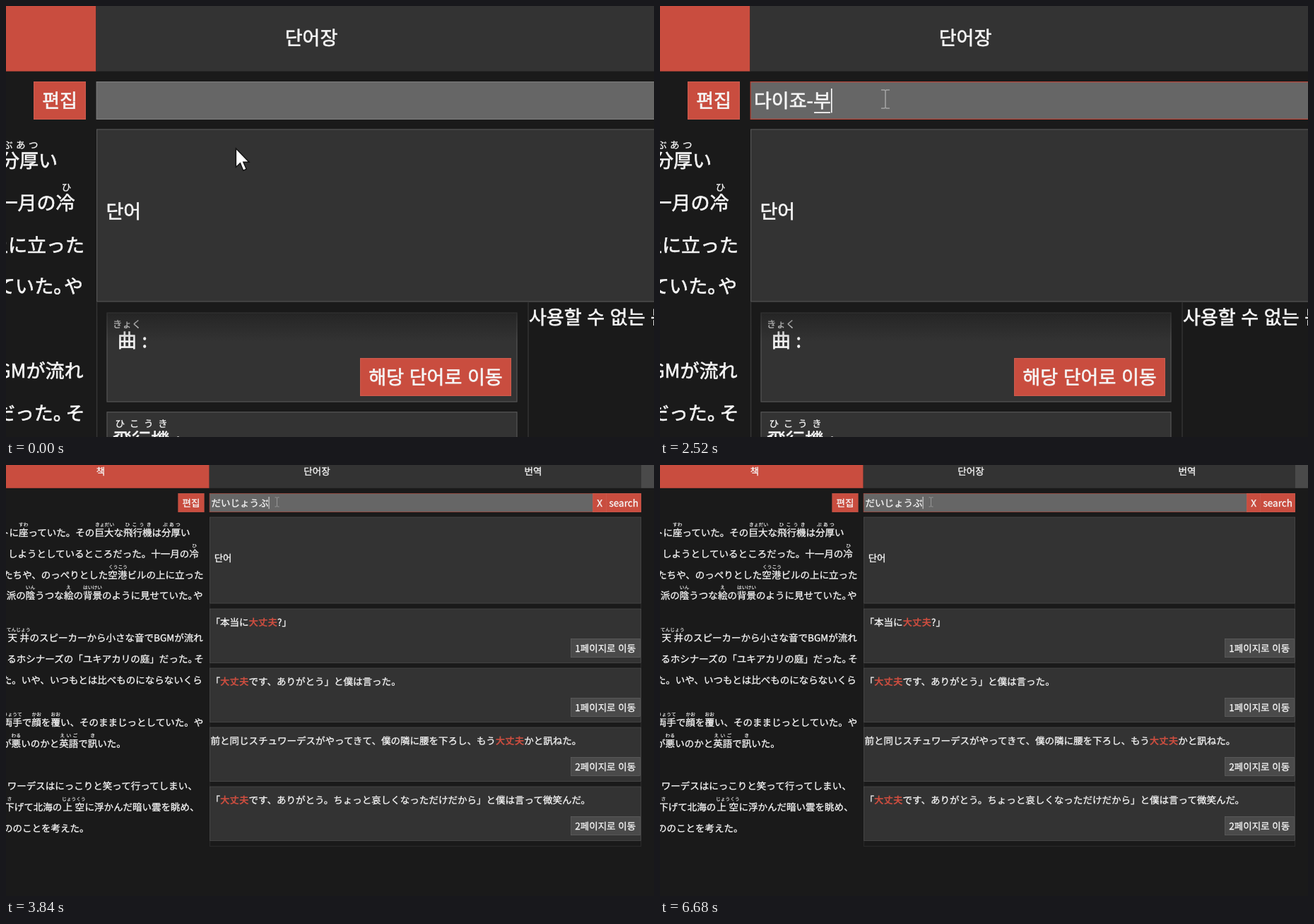
Write an HTML page that moves like this. It is 917 px wide and 611 px high and loops after 6720 ms.

```html
<!DOCTYPE html>
<html lang="ja">
<head>
<meta charset="utf-8">
<title>Word search</title>
<style>
html, body { margin: 0; width: 100%; height: 100%; overflow: hidden; background: #1a1a1a; }
svg { display: block; width: 917px; height: 611px; }
text {
  font: 500 13.53px "Noto Sans CJK JP", "Noto Sans CJK KR", "Noto Sans CJK", sans-serif;
  word-spacing: .8px; white-space: pre; text-rendering: geometricPrecision;
  fill: #f6f6f6; stroke: #f6f6f6; stroke-width: .32px;
}
text.ruby { font-size: 6.77px; stroke-width: .16px; }
text.mid, text.ruby { text-anchor: middle; }
.hit { fill: #c94d3f; stroke: none; font-weight: 700; }
</style>
</head>
<body>
<svg viewBox="0 0 917 611"><g id="world"></g></svg>
<script>
const LOOP = 6720, EM = 13.53, RUBY = 6.77;
const RED = '#c94d3f', PANEL = '#333', EDGE = '#555';

// Drawing helpers; text is placed by its vertical centre.
const rect = (x, y, w, h, fill, stroke = 'none', more = '') =>
  `<rect x="${x}" y="${y}" width="${w}" height="${h}" fill="${fill}" stroke="${stroke}" stroke-width=".6" ${more}/>`;
const text = (x, y, s, cls = '') => `<text x="${x}" y="${y + 5}" class="${cls}">${s}</text>`;
const line = (x1, y1, x2, y2) =>
  `<path d="M${x1} ${y1}L${x2} ${y2}" stroke="#363636" stroke-width=".7"/>`;
const group = (id, body) => `<g id="${id}">${body}</g>`;

function ruby(x, y, n, s) {
  const slot = Math.max(RUBY, n * EM / s.length);
  const left = x + (n * EM - slot * s.length) / 2;
  return [...s].map((c, i) =>
    `<text class="ruby" x="${left + (i + .5) * slot}" y="${y - 8.6}">${c}</text>`).join('');
}

const button = (x, y, w, s, fill = RED, stroke = '#cd5a4d') =>
  rect(x + .3, y + .3, w - .6, 26.4, fill, stroke) + text(x + w / 2, y + 13.5, s, 'mid');

// Book lines: y, then [x, text] runs
const book = [
  [96, [-9.5, 'トに座っていた。その巨大な飛行機は分厚い']],
  [126, [2.5, 'しようとしているところだった。十一月の冷']],
  [156, [-4.3, 'たちや、のっぺりとした空港ビルの上に立った']],
  [185, [.4, '派の陰うつな絵の背景のように見せていた。'], [264.6, 'や']],
  [245, [2, '天'], [19, '井'], [33, 'のスピーカーから小さな音でBGMが流れ']],
  [275, [.9, 'るホシナーズの「ユキアカリの庭」だった。'], [265.8, 'そ']],
  [305, [-5.7, 'た。いや、いつもとは比べものにならないくら']],
  [365, [-4.6, '両手で顔を覆い、そのままじっとしていた。や']],
  [395, [-6.3, 'が悪いのかと英語で訊いた。']],
  [455, [1.3, 'ワーデスはにっこりと笑って行ってしまい、']],
  [485, [-2.2, '下げて北海の'], [80, '上'], [97, '空'], [111, 'に浮かんだ暗い雲を眺め、']],
  [515, [-4.5, 'ののことを考えた。']]
];

// Readings: x, y, width in characters, kana
const readings = [
  [17.5, 96, 1, 'すわ'], [125.7, 96, 2, 'きょだい'], [166.3, 96, 3, 'ひこうき'], [220.5, 96, 2, 'ぶあつ'],
  [259.6, 126, 1, 'ひ'], [144.5, 156, 2, 'くうこう'], [27.4, 185, 1, 'いん'], [81.5, 185, 1, 'え'],
  [108.6, 185, 2, 'はいけい'], [3.8, 245, 2, 'てんじょう'], [-4.6, 365, 2, 'りょうて'], [36, 365, 1, 'かお'],
  [63, 365, 1, 'おお'], [7.2, 395, 1, 'わる'], [74.9, 395, 2, 'えいご'], [115.5, 395, 1, 'き'],
  [-2.2, 485, 1, 'さ'], [82, 485, 2, 'じょうくう']
];

const words = [
  ['曲', 1, 'きょく'], ['飛行機', 3, 'ひこうき'], ['整備工', 3, 'せいびこう'],
  ['思い', 1, 'おも'], ['座って', 1, 'すわ'], ['巨大', 2, 'きょだい']
];

const hit = '<tspan class="hit">大丈夫</tspan>';
const results = [
  [`「本当に${hit}?」`, 1],
  [`「${hit}です、ありがとう」と僕は言った。`, 1],
  [`前と同じスチュワーデスがやってきて、僕の隣に腰を下ろし、もう${hit}かと訊ねた。`, 2],
  [`「${hit}です、ありがとう。ちょっと哀しくなっただけだから」と僕は言って微笑んだ。`, 2]
];

const bookPart = '<g transform="translate(.4 0)">' +
  book.map(([y, ...runs]) => runs.map(([x, s]) => text(x, y, s)).join('')).join('') +
  readings.map(r => ruby(...r)).join('') + '</g>';

const header = rect(-30, -16, 317.7, 48.8, RED) + rect(287.7, -16, 611.3, 48.8, PANEL) +
  rect(899, -16, 30, 48.8, '#4a4a4a') +
  text(134, 9, '책', 'mid') + text(440, 9, '단어장', 'mid') + text(746, 9, '번역', 'mid');

const wordCard = ([w, n, kana], i) => {
  const y = 204 + i * 70.35, x = i ? 299.5 : 302.9;
  return rect(295.5, y, 290, 63, PANEL, EDGE) + text(x, y + 19.5, w + ' :') +
    ruby(x, y + 19.2, n, kana) + button(474.5, y + 32, 107, '해당 단어로 이동');
};

const listPart = line(288.3, 196, 288.3, 620) + line(593.5, 196, 593.5, 620) + line(899, 196, 899, 620) +
  words.map(wordCard).join('') + rect(288.7, 196.4, 304.4, 28, 'url(#shade)') +
  text(594, 207, '사용할 수 없는 문자가 포함되어 있음');

const resultPart = rect(288.3, 196, 610.4, 344.5, 'none', '#363636') + results.map(([s, page], i) => {
  const y = 204 + i * 84;
  return rect(288.5, y, 610, 76.5, PANEL, EDGE) + text(289.4, y + 18.5, s) +
    button(799, y + 42, 98.5, page + '페이지로 이동', '#4a4a4a', '#666');
}).join('');

const arrow = '<path id="arrow" d="M0 0V13.2L3 10.4L5.2 15.6L7.4 14.6L5.2 9.6H9.3Z" fill="#fff" stroke="#111" stroke-width=".7"/>';
const beam = '<path id="beam" d="M-3 -6.5H-.7L0 -6L.7 -6.5H3M0 -6V6M-3 6.5H-.7L0 6L.7 6.5H3" fill="none" stroke="#a2a2a2" stroke-width=".8"/>';

const $ = id => document.getElementById(id);
$('world').innerHTML =
  `<defs><linearGradient id="shade" x2="0" y2="1">
    <stop stop-color="#1a1a1a" stop-opacity=".9"/><stop offset=".4" stop-color="#1a1a1a" stop-opacity=".45"/>
    <stop offset="1" stop-color="#1a1a1a" stop-opacity="0"/></linearGradient></defs>` +
  bookPart + header + button(243.5, 40, 37, '편집') +
  rect(288.1, 40.3, 610.6, 26.4, '#666', '#7a7a7a', 'id="field"') +
  text(290.5, 53.5, '').replace('<text', '<text id="query"') +
  rect(0, 61.6, 0, .9, '#f6f6f6', 'none', 'id="under"') +
  rect(0, 45, .8, 17.2, '#fff', 'none', 'id="caret"') +
  button(849.3, 40, 49.7, 'search') + group('clear', button(830, 40, 20, 'X')) +
  rect(288.3, 74, 610.4, 122, PANEL, EDGE) + text(294.7, 132, '단어') +
  group('list', listPart) + group('results', resultPart) + arrow + beam;

// Typing: time, text, whether the last letter is being composed
const typing = [
  [0, '', 0], [1120, 'ㄷ', 1], [1240, '다', 1], [1360, '당', 1], [1480, '다이', 1], [1680, '다잊', 1],
  [1840, '다이죠', 1], [2120, '다이죠-', 0], [2360, '다이죠-ㅂ', 1], [2520, '다이죠-부', 1], [3400, 'だいじょうぶ', 0]
];
const FOCUS = 560, CUT = 2760, FOUND = 3400, CLEAR = 3440, BLINK = 530;

const charWidth = c => c === '-' ? .347 * EM : /[ㄱ-ㅎ가-힣]/.test(c) ? .92 * EM : EM;
const widthOf = s => [...s].reduce((sum, c) => sum + charWidth(c), 0);
const ease = (t, a, b) => {
  const p = Math.min(1, Math.max(0, (t - a) / (b - a)));
  return p * p * (3 - 2 * p);
};
const show = (id, on) => $(id).setAttribute('visibility', on ? 'visible' : 'hidden');
const set = (id, attrs) => { for (const k in attrs) $(id).setAttribute(k, attrs[k]); };

function draw(t) {
  // Close-up first, then a hard cut to the full view
  set('world', { transform: t < CUT ? 'translate(-448 27) scale(2)' : '' });

  const [, s, composing] = typing.filter(k => k[0] <= t).pop();
  const end = 290.5 + widthOf(s), last = widthOf(s.slice(-1));
  if ($('query').textContent !== s) $('query').textContent = s;
  set('under', { x: end - last + .5, width: Math.max(0, last - 1) });
  show('under', composing);
  set('caret', { x: end });
  show('caret', t >= FOCUS && (t < FOUND || Math.floor((t - FOUND) / BLINK) % 2 === 0));
  set('field', { stroke: t >= FOCUS ? '#b9463a' : '#7a7a7a' });

  show('list', t < FOUND);
  show('results', t >= FOUND);
  show('clear', t >= CLEAR);

  const m = ease(t, 80, 440), x = 386.7 - 3.2 * m, y = 87.5 - 35 * m;
  const inside = y < 67;
  for (const id of ['arrow', 'beam']) set(id, { transform: `translate(${x} ${y})` });
  show('arrow', !inside);
  show('beam', inside);
}

const start = performance.now();
function tick() {
  draw((performance.now() - start) % LOOP);
  requestAnimationFrame(tick);
}
tick();
</script>
</body>
</html>
```
